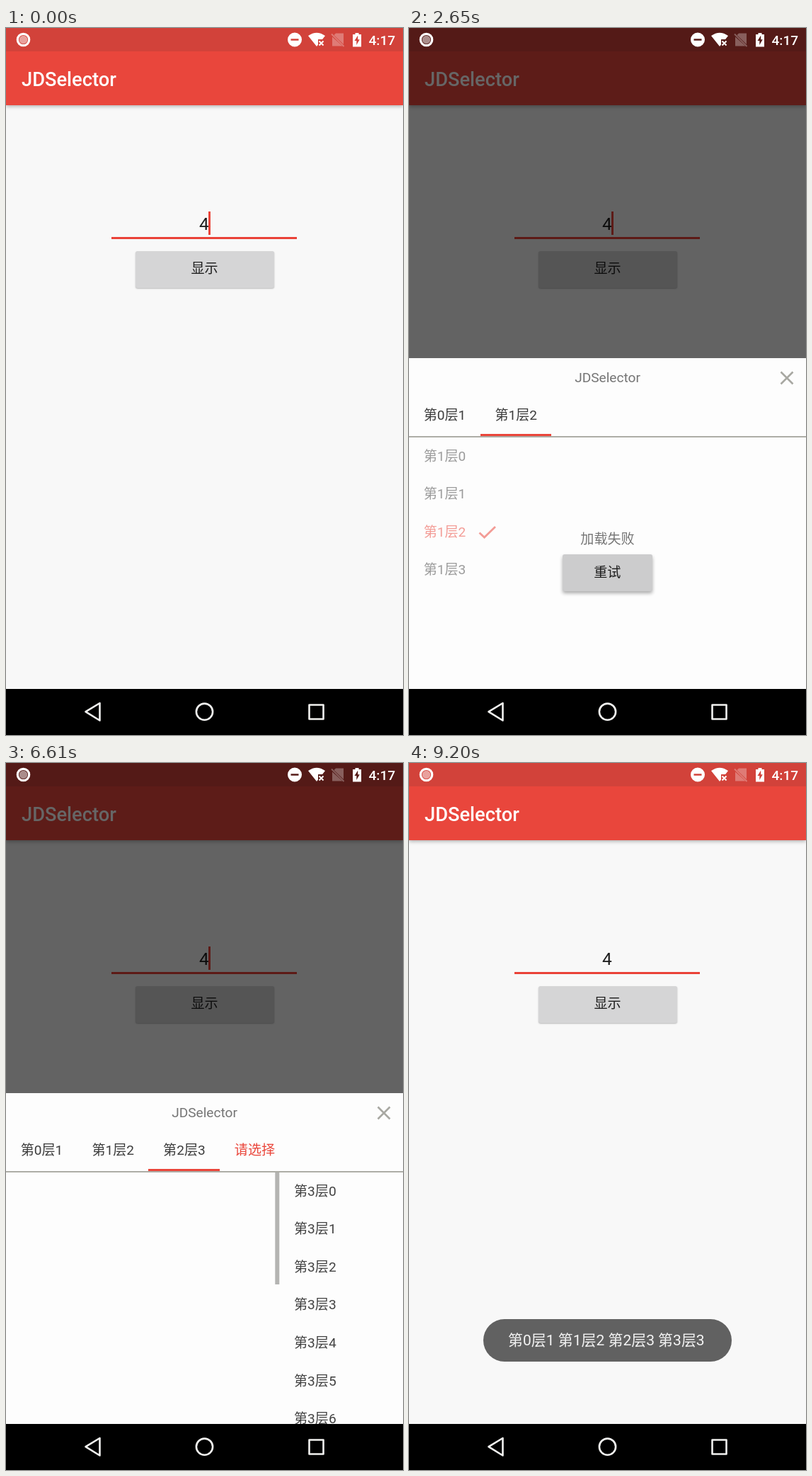
Animation, 561 px wide and 998 px high, one loop 9.74 s. Source, as an HTML page:

```html
<!DOCTYPE html>
<html lang="zh-CN">
<head>
<meta charset="utf-8">
<title>JDSelector</title>
<style>
html, body { margin: 0; width: 100%; height: 100%; overflow: hidden; background: #000; }
body {
  position: relative;
  font: 19.1px/26px Roboto, "Noto Sans CJK SC", "Noto Sans CJK", sans-serif;
  white-space: nowrap;
}
div, svg { position: absolute; box-sizing: border-box; }
#stage { left: 0; top: 0; width: 561px; height: 998px; overflow: hidden; background: #000; }
#app, #dim { left: 0; top: 0; width: 561px; height: 933px; }
#app { background: #f8f8f8; overflow: hidden; }
#dim { background: #000; }
#status { width: 561px; height: 33px; background: #d2423a; }
#bar {
  width: 561px; height: 109px; background: #e9463c; color: #fff;
  font-size: 27.3px; font-weight: 500; line-height: 32px; padding: 57px 22px 0;
  box-shadow: 0 2px 5px rgba(0, 0, 0, .28);
}
#field {
  left: 149px; top: 258px; width: 262px; height: 40px; border-bottom: 3px solid #ea4238;
  font-size: 24.5px; line-height: 38px; text-align: center; color: #1c1c1c;
}
#cursor { left: 286px; top: 259px; width: 2.7px; height: 33px; background: #ea453a; }
.btn {
  background: #d5d5d6; color: #1e1e1e; border-radius: 3px; text-align: center;
  box-shadow: 0 1px 2px rgba(0, 0, 0, .25);
}
#show { left: 182.5px; top: 315px; width: 196px; height: 51.5px; line-height: 50px; }
#retry {
  left: 217px; top: 277px; width: 126.5px; height: 52px; line-height: 51px;
  box-shadow: 0 3px 5px rgba(0, 0, 0, .32);
}
.tint { inset: 0; background: #000; border-radius: inherit; opacity: 0; }
#dialog { left: 0; top: 466px; width: 561px; height: 467px; background: #fdfdfd; overflow: hidden; }
#title { top: 15px; width: 561px; text-align: center; color: #757575; }
.tab { top: 68px; color: #3c3c3c; }
.todo { color: #ea453a; }
#rule { top: 110px; width: 561px; height: 1.6px; background: #adada6; }
#mark { top: 107px; height: 3.2px; background: #ea453a; }
#pager { top: 111.5px; width: 561px; height: 355.5px; overflow: hidden; }
.page, .list { width: 561px; height: 356px; }
.row { width: 561px; height: 53.6px; line-height: 53.6px; padding-left: 20.7px; color: #424242; }
.row svg { left: 98px; top: 17px; visibility: hidden; }
.on { color: #ea453a; }
.on svg { visibility: visible; }
.thumb { right: 0; top: 0; width: 5.6px; background: #b4b4b2; }
#fail { width: 561px; height: 467px; }
#fail p { position: absolute; margin: 0; top: 243px; width: 561px; text-align: center; color: #757575; }
#toast {
  left: 105px; top: 785px; width: 351px; height: 60px; border-radius: 30px;
  background: #616161; color: #f4f4f4; font-size: 20.97px; line-height: 60px; padding-left: 35px;
}
#icons { left: 0; top: 0; }
</style>
</head>
<body>
<div id="stage">
  <div id="app">
    <div id="bar">JDSelector</div>
    <div id="status"></div>
    <div id="field">4</div>
    <div id="cursor"></div>
    <div id="show" class="btn">显示<div class="tint"></div></div>
  </div>
  <div id="dim"></div>
  <div id="dialog">
    <div id="title">JDSelector</div>
    <svg width="561" height="60"><path d="M525.5 19.5l17 17m0-17l-17 17" stroke="#a8a8a2" stroke-width="2.6"/></svg>
    <div id="tabs"></div>
    <div id="rule"></div>
    <div id="mark"></div>
    <div id="pager"></div>
    <div id="fail"><p>加载失败</p><div id="retry" class="btn">重试<div class="tint"></div></div></div>
  </div>
  <div id="toast">第0层1 第1层2 第2层3 第3层3</div>
  <svg id="icons" width="561" height="998" fill="#fff">
    <circle cx="24.5" cy="16.5" r="5.8" fill-opacity=".5"/>
    <circle cx="24.5" cy="16.5" r="8.2" fill="none" stroke="#fff" stroke-width="3.2"/>
    <path fill-rule="evenodd" d="M398 16.5a10 10 0 0 1 20 0a10 10 0 0 1-20 0zM402.5 15.2v2.6h11v-2.6z"/>
    <path d="M427 11Q439 2.5 451 11L447 16H441V23.5L439 26z"/>
    <path d="M442.5 18.5l6 6m0-6l-6 6" stroke="#fff" stroke-width="2"/>
    <g opacity=".3"><path d="M466 7.5h11v15.5L463.5 9.9zM461 12.5l14.5 13H461z"/><path d="M460 8.5l17.5 17.5" stroke="#fff" stroke-width="1.8"/></g>
    <path fill-rule="evenodd" d="M490 9h3.5V7h5v2h3.5v17.5h-12zM497.2 10.5l-4.7 7.5h2.8v6l4.4-7.8h-2.5z"/>
    <text x="512.5" y="23.5" font-size="19.1" font-weight="500">4:17</text>
    <g fill="none" stroke="#f2f2f0" stroke-width="2.6" stroke-linejoin="round">
      <path d="M132.5 953v24.5L112.5 965.2z"/>
      <circle cx="280.5" cy="965.2" r="11.6"/>
      <path d="M428.5 955.5h20v20h-20z"/>
    </g>
  </svg>
</div>
<script>
const LOOP = 9740, W = 561, TAB = 100.7, TODO = 98.4;
const $ = id => document.getElementById(id);
const add = (parent, cls, html = '') => {
  const el = document.createElement('div');
  el.className = cls;
  el.innerHTML = html;
  return parent.appendChild(el);
};

// One entry per level: chosen row, time of the tap, scrollbar length.
const levels = [
  { rows: 7, pick: 1, tap: 850, bar: 215 },
  { rows: 4, pick: 2, tap: 1700, bar: 0 },
  { rows: 7, pick: 3, tap: 3400, bar: 158 },
  { rows: 7, pick: 3, tap: 7560, bar: 169 }
];
const opened = [0, 1190, 2657, 5160];
const failures = [
  { level: 1, from: 1850, shown: 2190, retry: 2420, to: 2657 },
  { level: 2, from: 3550, shown: 4170, retry: 4400, to: 5160 }
];
const check = '<svg width="26" height="20"><path d="M1.5 10.5l7 6.5L24 2" fill="none" stroke="#ea453a" stroke-width="2.8"/></svg>';

levels.forEach((lv, i) => {
  lv.tab = add($('tabs'), 'tab');
  lv.page = add($('pager'), 'page');
  lv.list = add(lv.page, 'list');
  for (let r = 0; r < lv.rows; r++) {
    const row = add(lv.list, 'row', `第${i}层${r}`);
    row.style.top = r * 53.6 + 'px';
    if (r === lv.pick) {
      row.innerHTML += check;
      lv.row = row;
      lv.tint = add(row, 'tint');
    }
  }
  add(lv.page, 'thumb').style.height = lv.bar + 'px';
  lv.tab.style.left = i * TAB + 20.7 + 'px';
});

const out = n => x => 1 - (1 - x) ** n;
const smooth = x => x * x * (3 - 2 * x);
const ramp = (t, start, length, ease = x => x) =>
  ease(Math.min(1, Math.max(0, (t - start) / length)));
const press = (t, start) => ramp(t, start, 80) * (1 - ramp(t, start + 180, 300));
const tintOf = el => el.querySelector('.tint').style;

function pagePos(t) {
  const slide = start => ramp(t, start, 200, out(5));
  const swipe = (start, drag, part) =>
    part * ramp(t, start, drag, smooth) + (1 - part) * ramp(t, start + drag, 350, out(4));
  return slide(1190) + slide(2657) + slide(5168) - swipe(5720, 230, .65) + swipe(6380, 480, .66);
}

function markPos(t) {
  const move = start => ramp(t, start, 300, smooth);
  return move(1230) + move(2700) + move(5210) - move(5950) + move(6860);
}

function drawDialog(t) {
  const open = 420, close = 7699;
  const alpha = ramp(t, open, 150, out(3)) * (1 - ramp(t, close, 150, out(3)));
  const scale = .9 + .1 * (ramp(t, open, 220, out(5)) - ramp(t, close, 220, out(5)));
  $('dim').style.opacity = .6 * (ramp(t, open, 200) - ramp(t, close, 200));
  $('dialog').style.opacity = alpha;
  $('dialog').style.transform = scale < 1 ? `scale(${scale})` : 'none';

  const pos = pagePos(t), mark = markPos(t);
  const width = i => i < 3 && t >= levels[i].tap ? TAB : TODO;
  levels.forEach((lv, i) => {
    const chosen = i < 3 && t >= lv.tap;
    const label = chosen ? `第${i}层${lv.pick}` : '请选择';
    if (lv.tab.textContent !== label) lv.tab.textContent = label;
    lv.tab.className = chosen ? 'tab' : 'tab todo';
    lv.tab.style.visibility = lv.page.style.visibility = t >= opened[i] ? 'visible' : 'hidden';
    lv.page.style.transform = `translateX(${(i - pos) * W}px)`;
    lv.row.className = chosen ? 'row on' : 'row';
    lv.tint.style.opacity = .04 * press(t, lv.tap);
    lv.list.style.opacity = 1;
  });

  const lo = Math.floor(mark), f = mark - lo;
  $('mark').style.left = mark * TAB + 'px';
  $('mark').style.width = width(lo) * (1 - f) + width(Math.min(3, lo + 1)) * f + 'px';

  let failAlpha = 0, push = 0;
  for (const e of failures) {
    if (t < e.from || t >= e.to) continue;
    levels[e.level].list.style.opacity = 1 - .48 * ramp(t, e.from, 200);
    failAlpha = ramp(t, e.shown, 150);
    push = press(t, e.retry);
  }
  $('fail').style.opacity = failAlpha;
  tintOf($('retry')).opacity = .05 * push;
}

function frame() {
  const t = performance.now() % LOOP;
  drawDialog(t);
  tintOf($('show')).opacity = .12 * press(t, 190);
  $('cursor').style.opacity = t < 8160 || (t >= 8660 && t < 9200) ? 1 : 0;
  $('toast').style.opacity = ramp(t, 7725, 250);
  requestAnimationFrame(frame);
}
frame();
</script>
</body>
</html>
```
